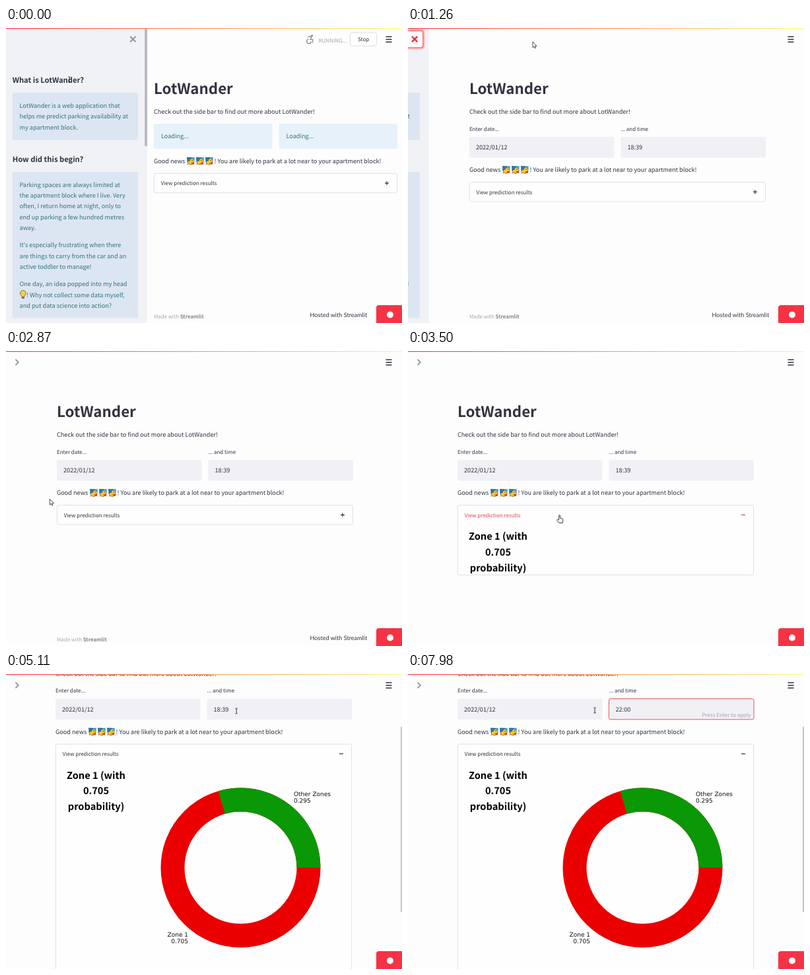
Write an HTML page that moves like this. It is 600x447 px and loops after 8 s.

```html
<!DOCTYPE html>
<html lang="en">
<head>
<meta charset="utf-8">
<title>LotWander</title>
<style>
  html, body { margin: 0; width: 100%; height: 100%; overflow: hidden; background: #fdfdfe; }
  svg { display: block; width: 600px; height: 447px; }
  text {
    font: 9.13px "Noto Sans CJK JP", "Noto Sans CJK SC", "Noto Sans CJK", "Noto Sans", sans-serif;
    fill: #31333f; text-rendering: geometricPrecision;
  }
  .small { font-size: 8px; }
  .tiny { font-size: 7.85px; fill: #a6a7ac; }
  .title { font-size: 22.3px; font-weight: 700; }
  .head { font-size: 11.2px; font-weight: 600; }
  .info text { fill: #31727f; }
  .zone { font-size: 14.6px; font-weight: 600; fill: #000; text-anchor: middle; }
  .plot text { font: 9px "DejaVu Sans", sans-serif; fill: #111; }
  .hosted { font: 9.1px Lato, sans-serif; }
  .strong { font-weight: 600; fill: #85868c; }
  .line { fill: none; stroke-linecap: round; stroke-linejoin: round; }
  .field { fill: #f0f0f5; }
  .end { text-anchor: end; }
</style>
</head>
<body>
<svg viewBox="0 0 600 447">
  <defs>
    <linearGradient id="stripe"><stop stop-color="#ff4b4b"/><stop offset="1" stop-color="#fffd80"/></linearGradient>
    <g id="party">
      <circle r="5" cy=".6" fill="#fdc92f" stroke="#5d4a1c" stroke-width=".7"/>
      <path d="M-5.6-5.4 2-5 -4.8 1.2Z" fill="#1b7fc4" stroke="#173a5c" stroke-width=".6"/>
      <path d="M1-5.4 5.8-5.6 5.5-.4 3.4-2.4Z" fill="#2f9fe0"/>
      <path d="M-2.4-.6h1.4M1.4-.8h1.4" stroke="#3d2c10"/>
      <path d="M-.4 3 5.4 1.8 4.8 5.4Z" fill="#d8322f"/>
      <circle cx="-4.6" cy="4.8" r=".8" fill="#d8322f"/>
    </g>
  </defs>
  <rect width="600" height="447" fill="#fdfdfe"/>

  <g id="page">
    <text class="title" y="100">LotWander</text>
    <text y="130.3">Check out the side bar to find out more about LotWander!</text>

    <g id="loading" class="info">
      <g><rect class="column" y="145" height="38" rx="2.5" fill="#e6f1f9"/><text x="11" y="167.3">Loading...</text></g>
      <g class="second"><rect class="column" y="145" height="38" rx="2.5" fill="#e6f1f9"/><text x="11" y="167.3">Loading...</text></g>
    </g>

    <g id="inputs">
      <text class="small" y="155.6">Enter date...</text>
      <rect class="column field" y="165" height="31.4" rx="2.5"/>
      <text x="10" y="184.4">2022/01/12</text>
      <g class="second">
        <text class="small" y="155.6">... and time</text>
        <rect id="timeBox" class="column field" y="165" height="31.4" rx="2.5"/>
        <rect id="selection" y="174.5" height="13" fill="#3f8ff0"/>
        <text id="time" x="10" y="184.4">18:39</text>
        <path id="caret" d="M0 175.5v11" stroke="#31333f" stroke-width=".8"/>
        <text id="hint" class="small end" x="215" y="192.8" style="fill:#a3a5ad">Press Enter to apply</text>
      </g>
    </g>

    <g id="lower">
      <text y="205.2">Good news</text>
      <use href="#party" x="56" y="201.5"/><use href="#party" x="70" y="201.5"/><use href="#party" x="84" y="201.5"/>
      <text x="91.5" y="205.2">! You are likely to park at a lot near to your apartment block!</text>
      <rect id="expander" x=".4" y="220.4" rx="2.5" fill="#fefefe" stroke="#dcdde1" stroke-width=".9"/>
      <text id="label" class="small" x="10.7" y="238.4">View prediction results</text>
      <path id="toggle" class="line" stroke-width="1.2"/>
    </g>

    <g id="results">
      <text class="zone" x="61.5" y="286.3">Zone 1 (with</text>
      <text class="zone" x="61.5" y="309.9">0.705</text>
      <text class="zone" x="61.5" y="333.6">probability)</text>
    </g>
    <g id="plot" class="plot">
      <circle cx="280.5" cy="421" r="103" fill="none" stroke="#ea0000" stroke-width="36"/>
      <path id="others" fill="none" stroke="#0a9806" stroke-width="36"/>
      <text x="361" y="312">Other Zones</text><text x="361" y="322.7">0.295</text>
      <text class="end" x="201" y="525">Zone 1</text><text class="end" x="201" y="535.8">0.705</text>
    </g>
  </g>

  <text id="footer" class="tiny" y="440.4">Made with <tspan class="strong">Streamlit</tspan></text>
  <rect id="thumb" x="598" width="2" height="281" fill="#c3c5cb"/>
  <path id="chevron" class="line" d="M15 13.2 18.8 17 15 20.8" stroke="#9b9ca3" stroke-width="2"/>

  <g id="running">
    <g class="line" stroke="#8b8c93" stroke-width="1.3">
      <circle cx="463.6" cy="11.8" r="1" fill="#8b8c93"/>
      <path d="M457.6 14 460 12.4 463 14 460.8 17.4H465L464.4 22M458 17.2A3.3 3.3 0 1 0 462.2 21"/>
    </g>
    <text class="small" x="473.5" y="21.8" style="fill:#a3a5ad">RUNNING...</text>
    <rect x="521.5" y="7" width="40" height="20" rx="2.5" fill="#fff" stroke="#dcdde1"/>
    <text class="small" x="533" y="20">Stop</text>
  </g>
  <path d="M575.5 13.2h9M575.5 17.2h9M575.5 21.2h9" stroke="#31333f" stroke-width="1.5"/>

  <g id="sidebar">
    <rect width="214" height="447" fill="#f0f2f6"/>
    <rect id="sideThumb" x="210.3" width="3.6" height="179" rx="1" fill="#b4b7c0"/>
    <g id="focus" fill="none">
      <rect x="178.5" y="2.8" width="28" height="28.4" rx="4" stroke="#ffb9bd" stroke-width="2.4"/>
      <rect x="179.8" y="4.2" width="25.2" height="25.6" rx="3" stroke="#ff4b4b" stroke-width="1.1" fill="#fbfbfd"/>
    </g>
    <path id="close" class="line" d="M188.8 13.4l7 7m0-7-7 7" stroke-width="2.2"/>
    <text class="head" x="9.7" y="83.2">What is LotWander?</text>
    <text class="head" x="9.7" y="203">How did this begin?</text>
    <g id="about" class="info">
      <rect x="9.7" y="98" width="190.5" height="71.5" rx="2.5" fill="#dce6f2"/>
      <rect x="9.7" y="218" width="190.5" height="221.5" rx="2.5" fill="#dce6f2"/>
      <g stroke="#4b4a3a" stroke-width=".7">
        <path d="M24 407.4C24 405 21.4 404.400 21.400 402a4.400 4.400 0 0 1 8.800 0C30.200 404.400 27.600 405 27.600 407.400Z" fill="#fdd23c"/>
        <path d="M24.200 407.800h3.200v1.800h-3.200z" fill="#8b8f94"/>
      </g>
    </g>
  </g>

  <rect width="600" height="1.300" fill="url(#stripe)"/>
  <text id="hosted" class="hosted" x="460.500" y="437.600">Hosted with Streamlit</text>
  <path d="M561 447V424a4 4 0 0 1 4-4H600V447Z" fill="#f63344"/>
  <circle cx="582" cy="434.500" r="5" fill="#fff"/>

  <g id="cursor" stroke-linejoin="round">
    <path id="arrow" d="M0 0V8.600L2 6.900 3.300 9.700 4.700 9 3.400 6.300H6Z" fill="#fff" stroke="#222" stroke-width=".8"/>
    <path id="hand" d="M-1.400-5.500C-1.400-7 .4-7 .4-5.500V-2L3.500-1.300Q5-.8 4.800 1L4.200 5.500H-1.200L-4 1.600C-4.600.4-3.200-.4-1.400 1Z" fill="#fff" stroke="#222" stroke-width=".9"/>
    <path id="beam" d="M-1.700-4.200Q0-4.200 0-3.200 0-4.200 1.700-4.200M0-3.200V3.200M-1.700 4.200Q0 4.200 0 3.200 0 4.200 1.700 4.200" fill="none" stroke="#222" stroke-width=".9"/>
  </g>
</svg>
<script>
const LOOP = 8000, STAGE = 603;
const LOADED = 350, IDLE = 630, CLOSE = 910, SLIDE = 1065, HOVER = 3080,
      OPEN = 3360, CHART = 3640, LEAVE = 4560, DRAG = 5460, TYPE = 6300;
const $ = id => document.getElementById(id);
const all = selector => [...document.querySelectorAll(selector)];
const set = (el, attrs) => { for (const k in attrs) el.setAttribute(k, attrs[k]); };
const show = (id, on) => { $(id).style.display = on ? "" : "none"; };
const move = (el, x, y) => el.setAttribute("transform", `translate(${x} ${y})`);

// Interpolates rows of [time, ...values].
function track(t, rows, ease = p => p) {
  if (t <= rows[0][0]) return rows[0].slice(1);
  for (let i = 1; i < rows.length; i++) {
    const a = rows[i - 1], b = rows[i];
    if (t < b[0]) {
      const p = ease((t - a[0]) / (b[0] - a[0]));
      return a.slice(1).map((v, k) => v + (b[k + 1] - v) * p);
    }
  }
  return rows[rows.length - 1].slice(1);
}
const smooth = p => p * p * (3 - 2 * p);
const easeOut = p => 1 - (1 - p) ** 1.8;

const pointer = [
  [0, 96, 78], [140, 96, 78], [700, 190, 20], [1260, 189, 21], [1400, 189, 21],
  [2030, 420, 208], [2240, 429, 213], [2520, 427, 215], [2800, 53, 222],
  [3220, 229, 254], [3500, 230, 255], [3920, 232, 247], [4340, 232, 247],
  [4970, 350, 56], [DRAG, 346, 56], [5880, 283, 55]
];
const keys = [[TYPE, "2"], [6510, "22"], [6860, "22:"], [7140, "22:0"], [7350, "22:00"]];

function shape(t) {
  if (t < 200 || t >= 4830) return "beam";
  if ((t > 630 && t < 1120) || (t > HOVER && t < LEAVE)) return "hand";
  return "arrow";
}

function addParagraphs() {
  const paragraphs = [
    [121, "LotWander is a web application that", "helps me predict parking availability at", "my apartment block."],
    [240.600, "Parking spaces are always limited at", "the apartment block where I live. Very", "often, I return home at night, only to", "end up parking a few hundred metres", "away."],
    [332.200, "It's especially frustrating when there", "are things to carry from the car and an", "active toddler to manage!"],
    [391.400, "One day, an idea popped into my head", "! Why not collect some data myself,", "and put data science into action?"]
  ];
  for (const [top, ...lines] of paragraphs) lines.forEach((line, i) => {
    const el = document.createElementNS("http://www.w3.org/2000/svg", "text");
    set(el, { x: line[0] === "!" ? 31 : 20.500, y: top + i * 16.330 });
    el.textContent = line;
    $("about").append(el);
  });
}

function drawShare() {
  const a = 0.295 * 2 * Math.PI, r = 103;
  set($("others"), { d: `M${280.5 + r} 421A${r} ${r} 0 0 0 ${280.5 + r * Math.cos(a)} ${421 - r * Math.sin(a)}` });
}

function drawPage(t, edge) {
  const open = t >= OPEN, chart = t >= CHART, loaded = t >= LOADED;
  const width = Math.min(449, STAGE - edge - 20), column = (width - 10) / 2;
  const left = (STAGE + edge - width) / 2 - (open ? 2 : 0);
  const [scroll] = track(t, [[CHART, 0], [3920, 69.5], [4200, 127.5]]);

  move($("page"), left, -scroll);
  all(".column").forEach(el => set(el, { width: column }));
  all(".second").forEach(el => move(el, column + 10, 0));
  move($("lower"), 0, loaded ? 13.3 : 0);
  show("loading", !loaded);
  show("inputs", loaded);
  show("results", open);
  show("plot", chart);
  show("thumb", chart);
  set($("thumb"), { y: scroll * 0.627 });

  const tint = t >= HOVER && t < LEAVE ? "#e8404c" : "#31333f";
  set($("expander"), { width: width - 0.8, height: chart ? 356 : open ? 105.6 : 29.4 });
  $("label").style.fill = tint;
  set($("toggle"), { d: `M${width - 18.5} 235.1h5` + (open ? "" : "m-2.5-2.5v5"), stroke: tint });

  move($("footer"), left, 0);
  show("footer", !open);
}

function drawTimeField(t) {
  const typed = keys.filter(k => t >= k[0]).pop();
  const focused = t >= DRAG - 60;
  const [span] = track(t, [[DRAG, 0], [5740, 23]]);
  const selecting = t > DRAG && t < TYPE;
  $("time").textContent = typed ? typed[1] : "18:39";
  $("time").style.fill = selecting && span > 12 ? "#fff" : "#31333f";
  set($("timeBox"), { stroke: focused ? "#f0525a" : "none" });
  set($("selection"), { x: 33 - span, width: span });
  show("selection", selecting);
  show("hint", typed);
  show("caret", typed && (t < 7400 || (t - 7350) % 1000 < 500));
  if (typed) move($("caret"), 10.6 + $("time").getComputedTextLength(), 0);
}

function frame() {
  const t = performance.now() % LOOP;
  const [edge] = track(t, [[SLIDE, 214], [SLIDE + 300, 0]], easeOut);

  drawPage(t, edge);
  drawTimeField(t);

  move($("sidebar"), edge - 214, 0);
  show("sidebar", edge > 0);
  show("sideThumb", t < SLIDE);
  show("focus", t >= CLOSE);
  set($("close"), { stroke: t >= CLOSE ? "#f0283c" : "#9b9ca3" });
  show("chevron", edge === 0);
  show("running", t < IDLE);
  show("hosted", t < 3000);

  move($("cursor"), ...track(t, pointer, smooth));
  for (const id of ["arrow", "hand", "beam"]) show(id, id === shape(t));
  requestAnimationFrame(frame);
}

addParagraphs();
drawShare();
frame();
</script>
</body>
</html>
```
